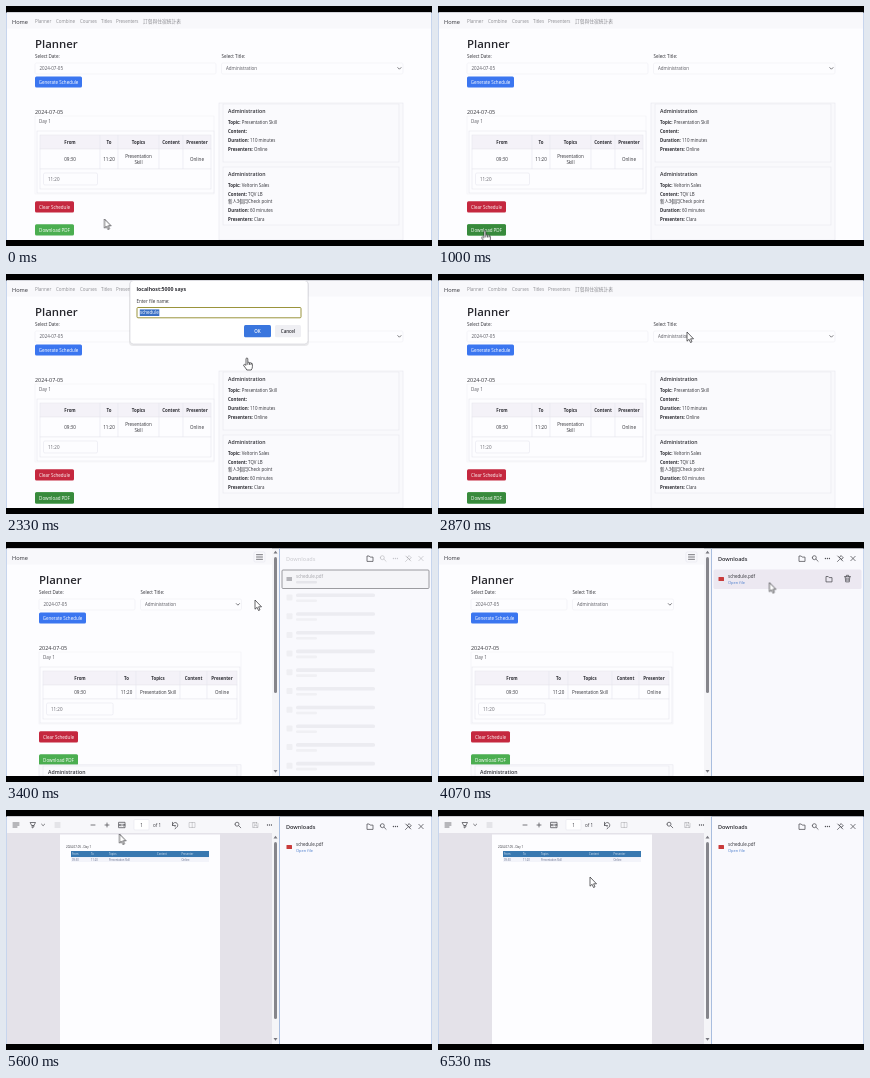
Recreate the animation shown at these times as an HTML page. Size 426 by 240 pixels, loop 6590 ms.

```html
<!DOCTYPE html>
<html lang="en">
<head>
<meta charset="utf-8">
<title>Planner</title>
<style>
html, body { margin: 0; width: 100%; height: 100%; overflow: hidden; background: #000; }
svg { display: block; width: 100vw; height: 100vh; }
text { font: 4.5px "Open Sans", "Noto Sans CJK TC", "Noto Sans CJK", sans-serif; fill: #303036; white-space: pre; }
.b { font-weight: 700; }
.m { font-weight: 600; }
.line { fill: none; stroke: #4c4c52; stroke-width: .75; stroke-linecap: round; stroke-linejoin: round; }
.pale { opacity: .3; }
.timed { animation: 6590ms step-end infinite; }
#wide { animation-name: wide; }
#hover { animation-name: hover; }
#dialog { animation-name: dialog; }
#narrow { animation-name: narrow; }
#panel { animation-name: panel; }
#loading { animation-name: loading; }
#files { animation-name: files; }
#active { animation-name: active; }
#blank { animation-name: blank; }
#pdf { animation-name: pdf; }
#arrow { animation-name: arrow; }
#hand { animation-name: hand; }
#cursor { animation: move 6590ms linear infinite; }
@keyframes wide { 0% { opacity: 1 } 47.5%, 100% { opacity: 0 } }
@keyframes hover { 0% { opacity: 0 } 11.8%, 100% { opacity: 1 } }
@keyframes dialog { 0% { opacity: 0 } 21.24% { opacity: 1 } 42.5%, 100% { opacity: 0 } }
@keyframes narrow { 0% { opacity: 0 } 47.5% { opacity: 1 } 70.86%, 100% { opacity: 0 } }
@keyframes panel { 0% { opacity: 0 } 47.5%, 100% { opacity: 1 } }
@keyframes loading { 0% { opacity: 0 } 47.5% { opacity: 1 } 54.6%, 100% { opacity: 0 } }
@keyframes files { 0% { opacity: 0 } 54.6%, 100% { opacity: 1 } }
@keyframes active { 0% { opacity: 0 } 57.7% { opacity: 1 } 75.9%, 100% { opacity: 0 } }
@keyframes blank { 0% { opacity: 0 } 70.86% { opacity: 1 } 76.9%, 100% { opacity: 0 } }
@keyframes pdf { 0% { opacity: 0 } 76.9%, 100% { opacity: 1 } }
@keyframes arrow { 0% { opacity: 1 } 11.8% { opacity: 0 } 38.4%, 100% { opacity: 1 } }
@keyframes hand { 0% { opacity: 0 } 11.8% { opacity: 1 } 38.4%, 100% { opacity: 0 } }
@keyframes move {
  0%, 2% { transform: translate(98.5px, 213px); animation-timing-function: ease-in-out }
  12.5%, 23% { transform: translate(46px, 224.5px); animation-timing-function: ease-in-out }
  34%, 36% { transform: translate(240px, 84px); animation-timing-function: ease-in-out }
  41%, 53% { transform: translate(249px, 58px); animation-timing-function: ease-in-out }
  62%, 73% { transform: translate(331.5px, 40.5px); animation-timing-function: ease-in-out }
  83%, 86% { transform: translate(113.5px, 24px); animation-timing-function: ease-in-out }
  97%, 100% { transform: translate(152px, 67px) }
}
</style>
</head>
<body>
<svg id="stage" viewBox="0 0 426 240" preserveAspectRatio="none"></svg>
<script>
const text = (x, y, s, { size = 4.5, fill = "#303036", cls = "", mid = false } = {}) =>
  `<text x="${x}" y="${y}" class="${cls}" style="font-size:${size}px;fill:${fill}"${mid ? ' text-anchor="middle"' : ""}>${s}</text>`;
const box = (x, y, w, h, fill, stroke = "none", r = 0, sw = .6) =>
  `<rect x="${x}" y="${y}" width="${w}" height="${h}" rx="${r}" fill="${fill}" stroke="${stroke}" stroke-width="${sw}"/>`;
const line = (d, cls = "") => `<path class="line ${cls}" d="${d}"/>`;
const layer = (id, body) => `<g id="${id}" class="timed">${body}</g>`;
const button = (x, y, w, h, fill, label, color = "#fff", cls = "") =>
  box(x, y, w, h, fill, "none", 1.5) + text(x + w / 2, y + h / 2 + 1.7, label, { fill: color, cls, mid: true });
const EDGE = "#e6e6ee", PAPER = "#fdfdff", SHADE = "#f4f2f8";

const select = (x, w, label, value, arrow) =>
  text(x, 52, label) + box(x, 57, w, 11, PAPER, "#eeeef3", 1.5) +
  text(x + 4.5, 64, value, { fill: "#55555c" }) +
  (arrow ? line(`M${x + w - 5.2} 61.6l1.6 1.6 1.6-1.6`) : "");

// Table sizes itself from its column edges and row height.
function table(cols, rowH, topic) {
  const left = cols[0], right = cols[5], rowEnd = 143 + rowH;
  const mids = cols.slice(1).map((c, i) => (c + cols[i]) / 2);
  const heads = ["From", "To", "Topics", "Content", "Presenter"];
  const y = 143 + rowH / 2 + 2;
  const cells = ["09:30", "11:20", "", "", "Online"];
  return box(left - 3, 125, right - left + 6, rowEnd - 101, PAPER, EDGE) +
    box(left, 129, right - left, 14, SHADE, EDGE) +
    box(left, 143, right - left, rowH, PAPER, EDGE) +
    box(left, rowEnd, right - left, 20, PAPER, EDGE) +
    cols.slice(1, 5).map(c => `<path d="M${c} 129V${rowEnd}" stroke="${EDGE}" stroke-width=".6"/>`).join("") +
    heads.map((h, i) => text(mids[i], 138, h, { cls: "b", mid: true, size: 4.4 })).join("") +
    cells.map((c, i) => text(mids[i], y, c, { mid: true })).join("") +
    topic.map((t, i) => text(mids[2], y + (i - (topic.length - 1) / 2) * 6.6, t, { mid: true })).join("") +
    box(left + 3.5, rowEnd + 4, (cols[1] - left) * .9, 12, PAPER, EDGE, 1.5) +
    text(left + 8, rowEnd + 12, "11:20", { fill: "#65656c" });
}

const planner = (x, selects, cols, rowH, topic, width) => {
  const clearY = 175.3 + rowH;
  return text(6, 17.5, "Home", { size: 5.6 }) +
    text(x, 42, "Planner", { size: 11.4, cls: "m", fill: "#28282e" }) + selects +
    button(x, 70.5, 47, 11, "#3b76f0", "Generate Schedule") +
    text(x, 108, "2024-07-05", { size: 5.4 }) +
    box(x, 110, width, 78 + rowH - 20, "none", "#f1f1f5") +
    text(x + 4, 117.3, "Day 1", { fill: "#55555c" }) + table(cols, rowH, topic) +
    button(x, clearY, 39, 11.2, "#c5283f", "Clear Schedule") +
    button(x, clearY + 23, 39, 11.2, "#4bae50", "Download PDF");
};

function card(y, fields) {
  return box(217, y, 176, 58, "#fafafd", EDGE) +
    text(222, y + 9, "Administration", { size: 5.2, cls: "m" }) +
    fields.map(([dy, key, value]) =>
      text(222, y + dy, (key ? `<tspan font-weight="700">${key}:</tspan> ` : "") + value, { size: 4.4 })).join("");
}

function wide() {
  const nav = [[29, "Planner"], [50, "Combine"], [74, "Courses"], [95, "Titles"], [110, "Presenters"], [137, "訂餐與住宿統計表"]];
  const selects = select(29, 181, "Select Date:", "2024-07-05") + select(215.5, 181.5, "Select Title:", "Administration", true);
  return box(1, 6.5, 424, 227.5, PAPER) + box(1, 6.5, 424, 16, "#f8f8fb") +
    nav.map(([x, s]) => text(x, 17, s, { fill: "#8c8c91", size: x > 136 ? 4.75 : 4.5 })).join("") +
    planner(29, selects, [34, 94, 112, 153, 177, 205], 20, ["Presentation", "Skill"], 179) +
    layer("hover", button(29, 218.3, 39, 11.2, "#388a3c", "Download PDF")) +
    box(213, 97, 184, 137, "#f9f9fc", EDGE) +
    card(98, [[19.5, "Topic", "Presentation Skill"], [28.5, "Content", ""], [37.5, "Duration", "110 minutes"], [46.5, "Presenters", "Online"]]) +
    card(161, [[19.5, "Topic", "Veltorin Sales"], [28.5, "Content", "TQV LB"], [36, "", "新人3個月Check point"], [45, "Duration", "60 minutes"], [54, "Presenters", "Clara"]]);
}

const scrollbar = (top, bottom) => box(266, 7, 7, 227, "#f5f5f8") +
  box(268, top, 3, bottom - top, "#85858b", "none", 1.5) +
  `<path d="M267.5 ${top - 3.5}l2-2.8 2 2.8zM267.5 228l2 2.8 2-2.8z" fill="#77777e"/>`;

function narrow() {
  const selects = select(33, 96, "Select Date:", "2024-07-05") + select(134.5, 101, "Select Title:", "Administration", true);
  return box(1, 6.5, 272, 227.5, PAPER) + box(1, 6.5, 265, 16, "#f8f8fb") +
    box(248, 10, 11, 10, "none", EDGE, 1.5) + line("M250.5 12.7h6M250.5 15h6M250.5 17.3h6") +
    planner(33, selects, [37, 111, 130, 174, 201, 231], 14, ["Presentation Skill"], 202) +
    box(33, 222.8, 202, 11.2, "#f9f9fc", EDGE) + box(37, 224, 194, 10, "#fafafd", EDGE) +
    text(42, 232, "Administration", { size: 5.2, cls: "m" }) + scrollbar(15, 151);
}

const dialog = () =>
  box(123, 7, 180, 65, "#00000014", "none", 4) + box(124, 6.5, 178, 63.5, "#fff", "#d2d2d8", 3.5) +
  text(130.5, 17.3, "localhost:5000 says", { size: 5.2, cls: "b" }) +
  text(130.5, 28.5, "Enter file name:") +
  box(131, 33.5, 164, 10.3, "#fff", "#9a943c", 1, 1) + box(133.8, 35.4, 19.5, 6.6, "#3a70c4") +
  text(134, 40.3, "schedule", { fill: "#fff" }) +
  button(238, 51, 27, 12.3, "#3a76de", "OK", "#fff", "m") +
  button(269, 51, 26, 12.3, "#efeff3", "Cancel", "#303036", "m");

const folder = (x, y, cls) => line(`M${x - 3} ${y + 2.5}v-5h2.2l1 1.1h2.8v3.9z`, cls);
const lens = (x, y, cls) => line(`M${x + 1.3} ${y + .8}l2 2M${x - 2.5} ${y - .8}a2 2 0 1 0 4 0a2 2 0 1 0-4 0`, cls);
const dots = (x, y, cls = "") => [-2, 0, 2].map(d => `<circle class="${cls}" cx="${x + d}" cy="${y}" r=".65" fill="#4c4c52"/>`).join("");
const tools = cls => lens(376.8, 16.5, cls) + dots(389.4, 16.5, cls) +
  line("M399.5 19.5l2-2M401 15l3 3M401.6 15.5l1.4-2 2.3 2.3-2 1.4M399.7 14l5 5", cls) +
  line("M412.8 14.3l4.4 4.4M417.2 14.3l-4.4 4.4", cls);

function panel() {
  const ghosts = Array.from({ length: 10 }, (_, i) => {
    const y = 51.5 + i * 18.7;
    return box(280.5, y + 1, 6, 6, "#efeff3", "none", 1) + box(290, y, 79, 3.6, "#ececf1", "none", 1.5) +
      box(290, y + 6, 21, 2.6, "#f0f0f4", "none", 1);
  }).join("");
  const loading = text(280, 19, "Downloads", { size: 5.5, cls: "m", fill: "#d2d2d7" }) + tools("pale") +
    box(276, 28, 147, 18.5, "#f5f5f8", "#85858a", 1, .8) +
    box(280.5, 35, 5.5, 4, "#b4b4b9") + text(290, 36, "schedule.pdf", { fill: "#a5a5aa" }) +
    box(290, 39, 21, 2.6, "#e5e5ea", "none", 1) + ghosts;
  const active = box(275.5, 27.5, 148, 19.5, "#ece8f1", "none", 1.5) + folder(391, 37) +
    line("M406.5 34.7h6M407.2 34.7l.5 5.2h3.6l.5-5.2M408.4 34.5v-1.2h2.2v1.2M408.8 36.2v2.3M410.2 36.2v2.3");
  const files = text(280, 19, "Downloads", { size: 5.5, cls: "m" }) + tools("") + layer("active", active) +
    box(280.5, 35, 5.5, 4, "#c93b3b", "none", .5) + text(290, 36, "schedule.pdf") +
    text(290, 42, "Open file", { size: 4, fill: "#4a7ccc" });
  return box(273, 6.5, 152, 227.5, "#f9f9fd") + box(273, 6.5, 1, 227.5, "#a9bedf") +
    folder(364, 16.5) + layer("loading", loading) + layer("files", files);
}

function pdf() {
  const xs = [66, 85, 103, 151, 175.5];
  const row = (y, words, fill) => words.map((s, i) => text(xs[i], y, s, { size: 2.6, fill })).join("");
  return box(1, 6.5, 272, 227.5, "#e4e2e9") + box(1, 6.5, 272, 16.5, "#f7f7fa") +
    box(54, 24.5, 160, 209.5, PAPER) +
    line("M7 13h6M7 15h6M7 17h4M24.5 12.5h5l-1.6 3h-1.8zM26.2 15.5v2.5l1.6-1v-1.5M35.6 14.2l1.5 1.5 1.5-1.5") +
    line("M49 13h5M49 15h5M49 17h5", "pale") +
    line("M85 15h4M99 15h4M101 13v4M113 12.3h6v5.4h-6zM113 15h6M114.5 14l-1 1 1 1M117.5 14l1 1-1 1") +
    box(128, 9.5, 15, 10.5, "#fff", EDGE, 1) + text(135.5, 16.8, "1", { mid: true }) + text(147, 16.8, "of 1") +
    line("M166.5 15.5a2.7 2.7 0 1 1 4.8 1.4M166.5 12.3v3.2h3M169 16.5l1.2 1.2-1.2 1.2") +
    line("M183.5 12.5h5.5v5h-5.5zM186.2 12.5v5", "pale") + lens(231.5, 15) +
    line("M247 12.5h4l1 1v4h-5zM248 12.5v1.7h2.5v-1.7M248 17.5v-2h3v2", "pale") + dots(263.5, 15) +
    text(60, 38.2, "2024-07-05 - Day 1", { size: 2.9 }) +
    box(65, 41, 138, 6.2, "#3878b0") + box(65, 47.2, 138, 4.8, "#f3f4fa") +
    row(45, ["From", "To", "Topics", "Content", "Presenter"], "#e0eaf5") +
    row(50.5, ["09:30", "11:20", "Presentation Skill", "", "Online"], "#606a8a") + scrollbar(32, 209);
}

const cursor = `<g id="cursor">
  <g id="arrow" class="timed"><path d="M0 0V9.2L2.1 7.3 3.5 10.5 5 9.8 3.6 6.8H6.5Z" fill="#fff" stroke="#26262a" stroke-width=".7"/></g>
  <g id="hand" class="timed"><path d="M0 1Q0 0 .9 0T1.8 1V4.5Q3 3.8 3.5 4.8 4.6 4.2 5 5.2 6.4 4.9 6.4 6.2V8.7Q6.4 10.5 5.2 12H.8Q-.3 10-2.2 7.8-2.8 6.7-1.7 6.4-.8 6.4 0 7.4ZM1.8 4.5V6.8M3.5 4.8V6.9M5 5.2V7" fill="#fff" stroke="#26262a" stroke-width=".7"/></g></g>`;

document.getElementById("stage").innerHTML =
  box(0, 0, 426, 240, "#000") + box(0, 6.5, 426, 227.5, "#c7d5ed") +
  layer("wide", wide()) + layer("dialog", dialog()) + layer("narrow", narrow()) +
  layer("blank", box(1, 6.5, 272, 227.5, "#e7e5ec")) + layer("pdf", pdf()) + layer("panel", panel()) +
  cursor + box(0, 234, 426, 6, "#000");
</script>
</body>
</html>
```
